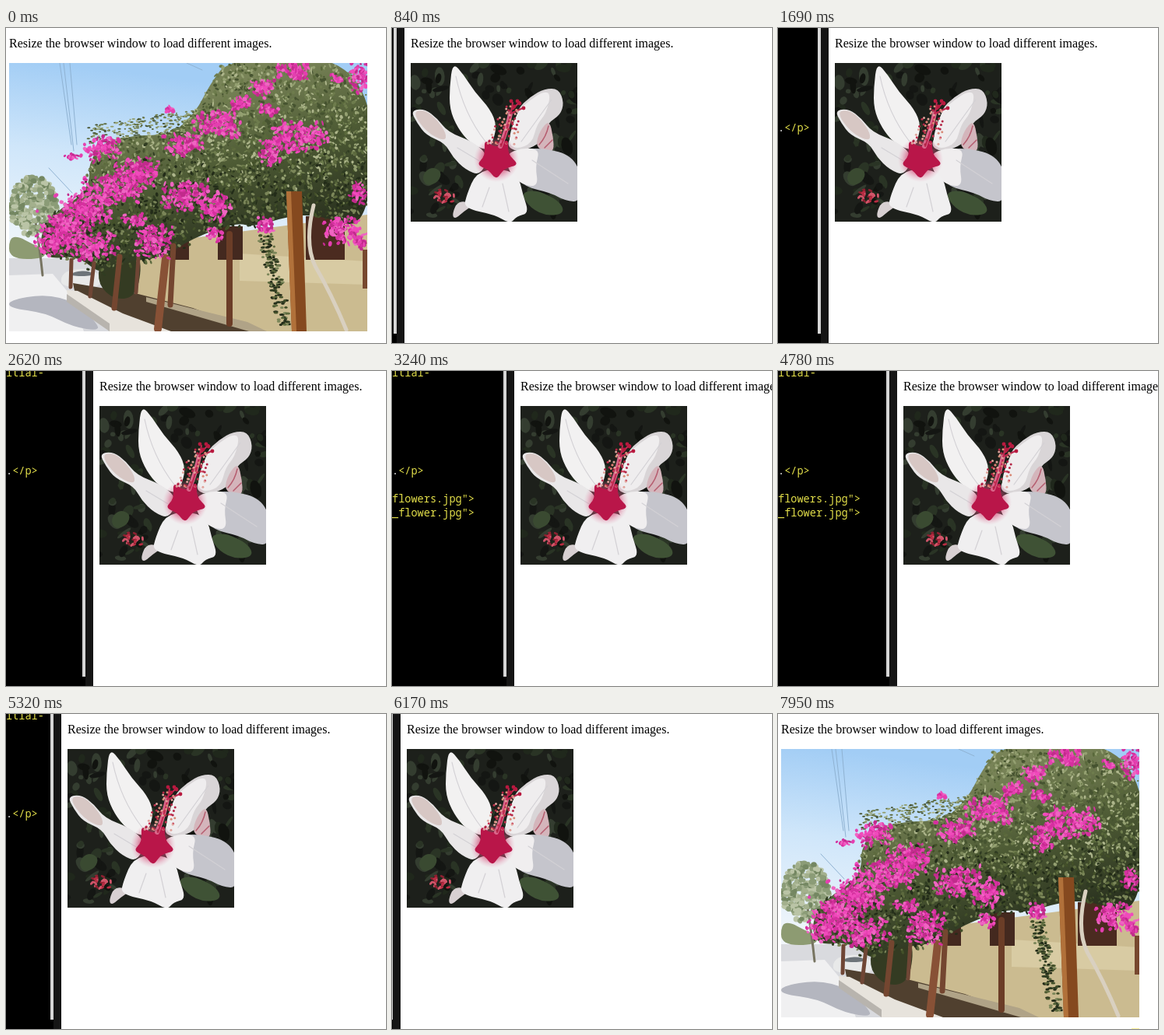
These frames come from a looping animation (488x405 px, 8.02 s). An HTML page with a canvas:

```html
<!DOCTYPE html>
<html lang="en">
<head>
<meta charset="utf-8">
<title>Responsive picture</title>
<style>
html, body { margin: 0; width: 100%; height: 100%; overflow: hidden; background: #fff; }
#stage { position: relative; width: 488px; height: 405px; overflow: hidden; background: #fff; }
#page { position: absolute; top: 0; left: 0; }
#page p {
  position: absolute; top: 11px; margin: 0; white-space: nowrap; color: #000;
  font: 16px/18px "Liberation Serif", "Times New Roman", serif;
}
#page canvas { position: absolute; left: 0; top: 45px; }
#editor { position: absolute; left: 0; top: 0; height: 405px; overflow: hidden; background: #000; }
#editor code {
  position: absolute; left: 0; white-space: pre; color: #e4e04a;
  font: 13.6px/18px "Noto Sans Mono", "DejaVu Sans Mono", monospace;
}
#editor i { font-style: normal; color: #f4f4f4; }
#bar { position: absolute; right: 0; top: 0; width: 10px; height: 405px; background: #151515; }
#scroll { position: absolute; right: 10px; top: 0; width: 4px; height: 393px; background: #d6d6d6; }
#mark { position: absolute; left: 454px; top: 404px; width: 10px; height: 1px; background: #fbf29a; }
</style>
</head>
<body>
<div id="stage">
  <div id="page">
    <p>Resize the browser window to load different images.</p>
    <canvas id="garden" width="460" height="345"></canvas>
    <canvas id="hibiscus" width="214" height="204"></canvas>
    <canvas id="roses" width="104" height="140"></canvas>
  </div>
  <div id="editor">
    <code id="meta"></code>
    <code id="para"><i>.</i>&lt;/p&gt;</code>
    <code class="wide" style="top:155px">flowers.jpg"&gt;</code>
    <code class="wide" style="top:173px">_flower.jpg"&gt;</code>
    <code class="wide" style="top:191px"><i>le=</i>"width:auto;"&gt;</code>
    <div id="scroll"></div>
    <div id="bar"></div>
  </div>
  <div id="mark"></div>
</div>
<script>
const $ = id => document.getElementById(id);

let seed = 7;
const rnd = () => (seed = (seed * 16807) % 2147483647) / 2147483647;
const pick = list => list[Math.floor(rnd() * list.length)];

// Closed shape through "x,y x,y ..."; round shapes bend at each point.
function shape(points, round = true) {
  const p = points.split(" ").map(s => s.split(",").map(Number));
  const path = new Path2D();
  p.forEach(([x, y], i) => {
    const [nx, ny] = p[(i + 1) % p.length];
    const mx = (x + nx) / 2, my = (y + ny) / 2;
    if (!round) path.lineTo(x, y);
    else if (i) path.quadraticCurveTo(x, y, mx, my);
    else path.moveTo(mx, my);
  });
  if (round) {
    const [a, b] = p;
    path.quadraticCurveTo(a[0], a[1], (a[0] + b[0]) / 2, (a[1] + b[1]) / 2);
  }
  path.closePath();
  return path;
}

function painter(id, left) {
  const c = $(id).getContext("2d");
  c.translate(-left, -45);
  c.lineCap = "round";
  return {
    c,
    fill(color, points, round) { c.fillStyle = color; c.fill(shape(points, round)); },
    line(color, width, d) { c.strokeStyle = color; c.lineWidth = width; c.stroke(new Path2D(d)); },
    rect(color, x, y, w, h) { c.fillStyle = color; c.fillRect(x, y, w, h); },
    dab(color, x, y, rx, ry = rx, turn = 0) {
      c.fillStyle = color;
      c.beginPath();
      c.ellipse(x, y, rx, ry, turn, 0, 7);
      c.fill();
    },
    glow(x, y, r, stops) {
      const g = c.createRadialGradient(x, y, 0, x, y, r);
      stops.forEach((s, i) => g.addColorStop(i / (stops.length - 1), s));
      c.fillStyle = g;
      c.fillRect(x - r, y - r, 2 * r, 2 * r);
    }
  };
}

function drawGarden() {
  const g = painter("garden", 4), c = g.c;
  const sky = c.createLinearGradient(60, 45, 30, 290);
  sky.addColorStop(0, "#a2cdf5");
  sky.addColorStop(.45, "#cfe6fa");
  sky.addColorStop(1, "#f1f6fa");
  g.rect(sky, 4, 45, 460, 345);
  g.line("#8fb2d2", 1, "M69 45 84 150M74 45 87 158M82 45 91 150M55 180 85 212M232 45 252 54");

  // Road, far trees and car
  g.rect("#d9dade", 4, 296, 200, 94);
  g.fill("#f0f0f1", "4,318 60,316 80,340 100,390 4,390", false);
  g.fill("#b4b6bf", "4,350 50,342 88,352 112,374 122,390 85,384 50,366 4,360");
  g.fill("#8d9b72", "4,270 16,268 34,278 50,284 50,297 4,297");
  g.line("#777461", 3, "M38 250Q43 280 47 318");
  const tree = ["#8b9c77", "#a3b08d", "#748762", "#bac4a6"];
  for (let i = 0; i < 330; i++) {
    const a = rnd() * 6.3, r = Math.sqrt(rnd());
    g.dab(pick(tree), 35 + Math.cos(a) * r * 30, 229 + Math.sin(a) * r * 38, 2 + rnd() * 3, 2 + rnd() * 2);
  }
  g.fill("#e8e9e9", "70,320 80,311 105,309 122,318 120,335 72,333");
  g.fill("#6d7479", "82,319 87,313 108,312 112,319");

  // Wall, planting bed and kerb
  g.fill("#cbbb90", "165,280 464,240 464,390 300,390 165,345", false);
  g.fill("#d8cba3", "300,290 464,300 464,330 300,325", false);
  g.fill("#50402f", "86,328 170,342 240,360 320,390 190,390 88,338", false);
  g.fill("#b0a387", "180,346 310,378 335,390 312,390 180,352", false);
  g.fill("#e7e3dc", "78,337 92,338 150,367 212,390 133,390 80,350", false);
  g.fill("#b8b4ae", "78,342 133,380 133,390 78,352", false);
  g.rect("#44291f", 210, 258, 25, 40);
  g.rect("#44291f", 272, 255, 32, 43);
  g.rect("#4b2b20", 385, 242, 50, 56);
  g.fill("#343b22", "120,300 160,285 175,298 168,345 140,350 118,330");

  // Canopy
  const canopy = shape("42,272 58,240 108,208 106,165 150,138 212,138 244,108 262,72 288,38 470,38 470,262 400,240 362,242 318,256 296,250 240,270 200,296 150,300 122,318 92,292 52,298");
  const shade = c.createLinearGradient(230, 90, 290, 280);
  shade.addColorStop(0, "#788357");
  shade.addColorStop(.5, "#4d5a34");
  shade.addColorStop(1, "#2c3420");
  c.fillStyle = shade;
  c.fill(canopy);
  const light = ["#94a071", "#6e7c4d", "#59683b", "#adb58b", "#465330"];
  const dark = ["#303c22", "#435029", "#5d6a3e", "#232c19", "#7b8659"];
  for (let i = 0; i < 6500; i++) {
    const x = 4 + rnd() * 460, y = 45 + rnd() * 270;
    c.setTransform(1, 0, 0, 1, 0, 0);
    const inside = c.isPointInPath(canopy, x, y);
    c.translate(-4, -45);
    if (inside) g.dab(pick(y > 150 + rnd() * 60 ? dark : light), x + rnd() * 12 - 6, y + rnd() * 12 - 6, 1 + rnd() * 2.4, .8 + rnd() * 1.3, rnd() * 3);
  }
  for (let i = 0; i < 330; i++) {
    const x = 105 + rnd() * 165;
    g.dab(pick(light), x, 140 - (x - 105) * .16 + rnd() * 28 - 14, 1 + rnd() * 1.6, 1);
  }

  // Posts, pale trunk and hanging vine
  g.line("#6b3d27", 8, "M287 265V380");
  g.line("#744630", 7, "M215 280 211 356M146 294 139 360");
  g.line("#885136", 10, "M205 296 195 387");
  g.line("#6f4635", 5, "M113 302 108 345M84 298 83 333M170 295 167 340");
  g.fill("#85491f", "360,210 380,210 386,390 367,390", false);
  g.fill("#b1713a", "360,210 366,210 373,390 367,390", false);
  g.rect("#77482f", 458, 285, 6, 50);
  g.line("#d9d0c0", 5, "M395 228Q383 277 397 306Q418 342 437 388");
  for (let i = 0; i < 150; i++) {
    const k = rnd();
    g.dab(pick(dark), 332 + k * 26 + rnd() * 18 - 9, 262 + k * 122, 1.5 + rnd() * 2, 1.5);
  }

  // Blossom clusters: x, y, half width, half height
  const clusters = `368 55 24 14,455 62 16 22,330 78 18 14,300 97 15 12,272 125 35 20,375 140 45 22,337 105 16 8,
    340 160 18 18,230 150 30 16,125 155 28 18,170 185 36 20,140 207 46 22,100 235 40 22,75 257 38 24,60 280 25 14,
    110 280 35 20,190 275 28 24,165 248 20 10,230 215 35 22,270 230 20 20,268 265 12 10,332 255 12 13,430 260 28 20,
    452 212 12 16,455 275 10 12,85 165 14 4,210 105 8 4,425 65 10 6`;
  const pinks = ["#e43fb0", "#d6309f", "#ef65c2", "#c12b8c", "#f04abb"];
  for (const [x, y, w, h] of clusters.split(",").map(s => s.trim().split(" ").map(Number)))
    for (let i = 0; i < w * h * .2 + 5; i++)
      g.dab(pick(pinks), x + (rnd() + rnd() - 1) * w, y + (rnd() + rnd() - 1) * h, 1.2 + rnd() * 2.8, 1 + rnd() * 1.8, rnd() * 3);
}

function drawHibiscus() {
  const h = painter("hibiscus", 24);
  h.rect("#1d201b", 24, 45, 214, 204);
  for (let i = 0; i < 170; i++)
    h.dab(pick(["#2a3425", "#141613", "#343d30", "#20281c", "#11130f"]), 24 + rnd() * 214, 45 + rnd() * 204, 3 + rnd() * 9, 2 + rnd() * 5, rnd() * 3);
  h.fill("#3f5235", "165,212 185,208 215,222 222,238 200,242 178,232");
  h.fill("#3a4a31", "38,190 50,178 64,184 60,198 44,204");

  h.fill("#d8d0d2", "77,242 82,226 92,222 104,228 92,236 82,245");
  h.fill("#d9d5d7", "160,105 178,88 196,78 214,78 221,96 216,112 200,122 194,142 184,152 160,160 146,150 160,130");
  h.fill("#efedee", "160,108 178,92 194,82 204,84 198,110 186,124 180,148 160,156 148,148");
  h.fill("#d4b5bb", "184,152 190,132 202,118 207,140 208,158 198,160");
  h.line("#b65e70", 1.5, "M189 150Q198 140 201 126M196 154 206 144");
  h.fill("#c5c5cc", "150,162 186,152 240,166 244,224 222,222 204,212 170,204 152,184");
  h.fill("#f0eeef", "146,162 168,154 190,156 184,178 188,204 168,202 150,186");
  h.fill("#f2f1f1", "78,44 92,60 106,82 126,104 135,126 128,150 122,158 100,148 84,128 74,104 74,76");
  h.fill("#e9e7e8", "24,106 42,104 58,116 72,134 104,146 124,164 114,190 94,182 78,166 68,148 44,138 32,122");
  h.fill("#d7c7c4", "26,108 42,105 58,118 70,136 68,146 44,134");
  h.fill("#f0eff0", "108,186 136,180 162,188 168,214 176,238 160,242 152,252 132,240 92,232 96,214");
  h.line("#d3d1d5", 1.2, "M82 62Q92 110 120 146M125 205 116 230M142 200 150 236M205 92 166 146M180 170 226 200M84 154 114 172");

  // Crimson throat and stamen
  h.glow(134, 169, 29, ["#a90f3f", "rgba(190,27,78,.93)", "rgba(211,70,115,.5)", "rgba(230,150,180,0)"]);
  h.fill("#b91649", "118,142 134,156 150,140 148,162 164,176 144,180 134,196 124,182 108,176 120,164");
  h.line("#d9668a", 6, "M139 152Q148 130 152 110");
  h.line("#bd2850", 2, "M140 152Q150 128 155 96M152 110 168 103M152 107 164 95");
  for (let i = 0; i < 65; i++) {
    const k = rnd();
    h.dab(pick(["#c4324f", "#d98a76", "#b32545", "#e0a29a"]), 141 + k * 13 + (rnd() - .5) * 36 * (1.1 - k * .5), 150 - k * 50, 1.5);
  }
  [[153, 94], [161, 94], [169, 103], [164, 97], [157, 101]].forEach(([x, y]) => h.dab("#b8193f", x, y, 2.4));
  for (let i = 0; i < 24; i++)
    h.dab(pick(["#b82c42", "#d1556a", "#8d2031"]), 67 + (rnd() - .5) * 26, 216 + (rnd() - .5) * 15, 3, 1.5, rnd() * 3);
}

function drawRoses() {
  const r = painter("roses", 202), c = r.c;
  const leaf = (x, y, len, deg) => {
    c.save();
    c.translate(x, y);
    c.rotate(deg * Math.PI / 180);
    const w = len * .5;
    c.fillStyle = "#4c8a36";
    c.fill(new Path2D(`M0 0Q${len * .4} ${-w} ${len} 0Q${len * .4} ${w} 0 0`));
    c.fillStyle = "#2f6527";
    c.fill(new Path2D(`M0 0Q${len * .4} ${w} ${len} 0Z`));
    r.line("#93bd73", .7, `M0 0H${len}M${len * .3} 0l4 -4M${len * .55} 0l4 -3`);
    c.restore();
  };
  const bloom = (x, y, size, turn) => {
    for (let i = 0; i < 5; i++) {
      c.save();
      c.translate(x, y);
      c.rotate(turn + i * Math.PI * .4);
      const g = c.createRadialGradient(0, 0, 2, 0, 0, size);
      g.addColorStop(0, "#f9d650");
      g.addColorStop(.35, "#f9a052");
      g.addColorStop(.75, "#f27a3d");
      g.addColorStop(1, "#df5428");
      c.fillStyle = g;
      c.strokeStyle = "#cf4a22";
      c.lineWidth = .7;
      c.scale(size / 28, size / 28);
      const petal = new Path2D("M0 0C9 -18 25 -15 28 -4Q24 0 28 5C23 17 8 16 0 0Z");
      c.fill(petal);
      c.stroke(petal);
      r.line("#fbb878", .8, "M9 -2 21 -6M9 2 22 4");
      c.restore();
    }
    for (let i = 0; i < 22; i++) {
      const a = i * 2.4, d = size * .3 * Math.sqrt(i / 22);
      r.dab(i % 3 ? "#f3cb3c" : "#a34a18", x + Math.cos(a) * d, y + Math.sin(a) * d, 1.2);
    }
    r.dab("#c0b53c", x, y, 2.5);
  };

  r.line("#77713a", 3, "M251 136Q247 158 232 180");
  r.line("#8a6d39", 2, "M252 142Q246 156 240 164M241 162 236 157");
  r.line("#5b7e37", 1.5, "M232 66 237 94M245 154 262 128 282 134M236 143 220 142M246 75 259 63M226 78 212 89");
  [[236, 80, 18, 200], [224, 88, 20, 165], [239, 77, 15, 235], [247, 76, 19, 285], [252, 67, 20, -10],
   [244, 78, 14, -40], [259, 122, 17, -20], [270, 131, 20, 45], [277, 132, 24, 0], [276, 127, 19, -35], [263, 129, 16, 80],
   [222, 142, 18, 170], [220, 147, 20, 130], [229, 142, 18, 80], [240, 143, 18, 70], [220, 139, 15, 205]
  ].forEach(a => leaf(...a));
  bloom(272, 89, 25, .3);
  bloom(235, 114, 29, -.5);
  r.fill("#ee7140", "224,58 230,48 238,46 243,54 240,66 231,70 225,66");
  r.line("#fbb074", 1.3, "M231 65Q231 55 235 51M236 65 239 54");
  r.fill("#56853a", "223,54 229,64 239,65 242,61 239,70 230,71");
}

drawGarden();
drawHibiscus();
drawRoses();

// Left edge of the page content over time
const LOOP = 8020;
const track = [
  [230, 6], [380, 9], [840, 24], [1150, 41], [1990, 91], [2620, 120], [2850, 136], [3700, 199], [3770, 202],
  [4550, 196], [5320, 79], [5600, 42], [5860, 23], [6010, 21], [6170, 19], [6550, 9], [6630, 7], [6710, 4]
];
// Bursts of movement: start, end, steps
const bursts = [
  [230, 230, 1], [380, 1150, 11], [1230, 1990, 11], [2070, 2850, 11], [2930, 3700, 11],
  [3770, 3770, 1], [4550, 5320, 11], [5400, 5860, 7], [6010, 6710, 10]
];
const ticks = bursts.flatMap(([from, to, n]) =>
  Array.from({ length: n }, (_, i) => Math.round((from + (to - from) * i / Math.max(1, n - 1)) / 10) * 10));

function offsetAt(t) {
  const tick = ticks.filter(k => k <= t).pop();
  if (tick === undefined) return 4;
  const i = track.findIndex(([k]) => k >= tick);
  const [t1, x1] = track[i];
  const [t0, x0] = track[Math.max(0, i - 1)];
  return t1 === tick ? x1 : Math.round(x0 + (x1 - x0) * (tick - t0) / (t1 - t0));
}

const show = (el, on) => { el.style.display = on ? "block" : "none"; };
const wideLines = document.querySelectorAll(".wide");

function render(t) {
  const x = offsetAt(t), room = x - 22;
  $("page").style.left = x + "px";
  $("editor").style.width = Math.max(0, x - 8) + "px";
  show($("garden"), x <= 7);
  show($("hibiscus"), x > 7 && x < 193);
  show($("roses"), x >= 193);

  const fits = room >= 144;
  $("meta").textContent = fits ? 'itial-scale=1.0">' : "itial-";
  $("meta").style.top = "-7px";
  show($("meta"), room >= 53);
  $("para").style.top = (fits ? 101 : 119) + "px";
  show($("para"), room >= 45);
  wideLines.forEach(el => show(el, room >= el.textContent.length * 8.16 + 5));
  show($("mark"), t >= 7950);
}

const start = performance.now();
function frame() {
  render((performance.now() - start) % LOOP);
  requestAnimationFrame(frame);
}
frame();
</script>
</body>
</html>
```
